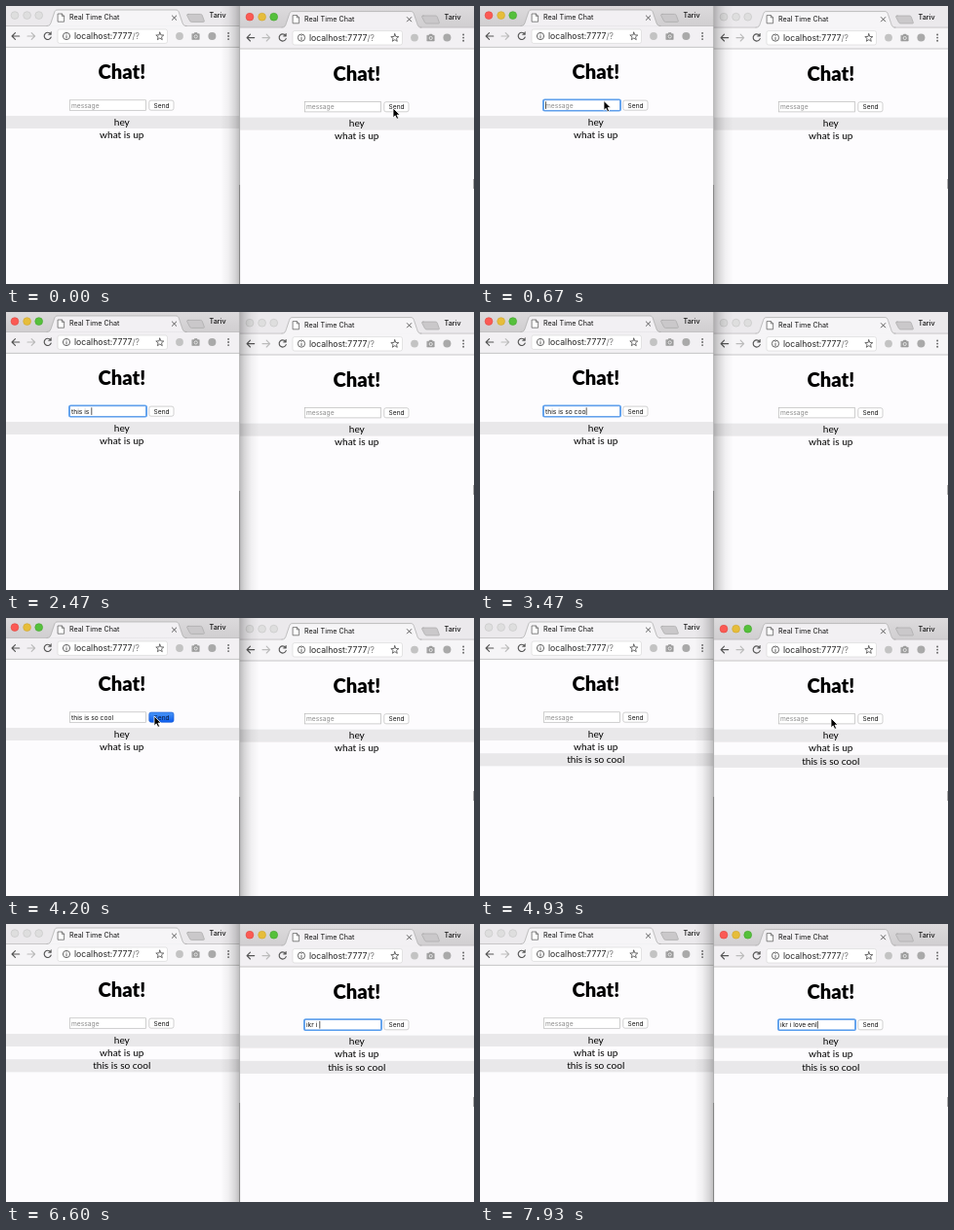
Animation of 480 by 286 pixels, one loop 8000 ms. Source, as an HTML page:

```html
<!DOCTYPE html>
<html lang="en">
<head>
<meta charset="utf-8">
<title>Real Time Chat</title>
<style>
  html, body { margin: 0; width: 100%; height: 100%; overflow: hidden; background: #fff; }
  svg { display: block; width: 480px; height: 286px; }
  .ui { font-family: Inter, Roboto, sans-serif; }
  .page { font-family: Lato, "Open Sans", sans-serif; text-anchor: middle; fill: #000; }
  .line { fill: none; stroke-linecap: round; stroke-linejoin: round; }
</style>
</head>
<body>
<svg id="stage" viewBox="0 0 480 286">
  <defs>
    <linearGradient id="shade">
      <stop offset="0" stop-color="#000" stop-opacity=".26"/>
      <stop offset=".25" stop-color="#000" stop-opacity=".15"/>
      <stop offset=".6" stop-color="#000" stop-opacity=".05"/>
      <stop offset="1" stop-color="#000" stop-opacity="0"/>
    </linearGradient>
    <linearGradient id="strip" x2="0" y2="1">
      <stop offset="0" stop-color="#dddbdd"/>
      <stop offset="1" stop-color="#d0ced0"/>
    </linearGradient>
    <linearGradient id="blue" x2="0" y2="1">
      <stop offset="0" stop-color="#4a97f8"/>
      <stop offset="1" stop-color="#0b5cee"/>
    </linearGradient>
  </defs>
</svg>
<script>
const LOOP = 8000, STEP = 200 / 3;
const stage = document.getElementById('stage');

function el(tag, attrs, parent, text) {
  const node = document.createElementNS('http://www.w3.org/2000/svg', tag);
  set(node, attrs);
  if (text) node.textContent = text;
  parent.appendChild(node);
  return node;
}
function set(node, attrs) {
  for (const key in attrs) node.setAttribute(key, attrs[key]);
}
const show = (node, on) => set(node, { visibility: on ? 'visible' : 'hidden' });

function makeWindow(x, y) {
  const root = el('g', { transform: `translate(${x} ${y})` }, stage);
  const rect = (x, y, width, height, fill, more) =>
    el('rect', { x, y, width, height, fill, ...more }, root);
  const path = (d, stroke, width, more) =>
    el('path', { d, stroke, 'stroke-width': width, class: 'line', ...more }, root);
  const text = (x, y, size, fill, str) =>
    el('text', { x, y, 'font-size': size, fill, class: 'ui' }, root, str);
  const circle = (cx, cy, r, fill, more) => el('circle', { cx, cy, r, fill, ...more }, root);
  const page = (y, size, weight, str) =>
    el('text', { x: 118.8, y, 'font-size': size, 'font-weight': weight, class: 'page' }, root, str);

  // Frame and tab
  rect(-1, -2, 240.4, 300, '#fdfcfe');
  const strip = rect(-1, -2, 240.4, 23, '#ebe9ec');
  const bar = rect(-1, 20.5, 240.4, 22, '#f2f0f3');
  path('M-1 20.5H42M184 20.5H239.4', '#b8b6b8', .7);
  const tab = path('M42 20.5C45 20.5 45.5 19 46.5 16L49.5 7C50.3 4.6 51 4 53 4H174C176 4 176.7 4.6 177.5 7L180.5 16C181.5 19 182 20.5 185 20.5', '#aaa', .7);
  path('M-1 42.4H239.4', '#b9b9b9', .8);
  path('M187 8.4H199.5Q200.8 8.4 201.3 9.6L203.3 15.2Q203.7 16.4 202.5 16.4H190.5Q189 16.4 188.5 15.2L185.6 9.6Q185.2 8.4 187 8.4Z', '#a9a9a9', .7, { style: 'fill:#cac8ca' });
  const lights = [9, 21.6, 33.7].map(cx => circle(cx, 9.6, 3.9, '#ddd', { 'stroke-width': .6 }));
  path('M53.5 8H57.3L59.6 10.3V16.2H53.5ZM57.3 8V10.3H59.6', '#666', .8, { style: 'fill:#fff' });
  text(65, 14.4, 7.2, '#111', 'Real Time Chat');
  path('M170.4 10L174.7 14.3M174.7 10L170.4 14.3', '#555', .95);
  set(text(208.5, 12.2, 7.2, '#111', 'Tariv'), { 'font-weight': 500 });

  // Toolbar
  path('M13.7 31H6.2M9.5 27.6L6.1 31L9.5 34.4', '#555', 1.15);
  path('M22 31H29.5M26.2 27.6L29.6 31L26.2 34.4', '#bbb', 1.15);
  path('M45.6 28.6A3.6 3.6 0 1 0 46.2 32', '#555', 1.15);
  path('M46.4 26.8V29.6H43.6Z', '#555', .5, { style: 'fill:#555' });
  rect(53, 24, 112.5, 14.4, '#fff', { rx: 2, stroke: '#d4d4d4', 'stroke-width': .6 });
  circle(62, 31, 3.6, 'none', { stroke: '#555', 'stroke-width': .9 });
  path('M62 30.7V33M62 29V29.1', '#555', .9);
  const url = text(70, 34, 8.65, '#222', 'localhost:7777');
  el('tspan', { fill: '#777' }, url, '/?');
  let star = '';
  for (let i = 0; i < 10; i++) {
    const r = i % 2 ? 1.8 : 4.2, a = i * Math.PI / 5;
    star += `${i ? 'L' : 'M'}${157.8 + r * Math.sin(a)} ${31.3 - r * Math.cos(a)}`;
  }
  path(star + 'Z', '#555', .85);
  circle(178, 31, 3.9, '#c3c3c3');
  path('M191.1 28.7H192.7L193.5 27.5H195.9L196.7 28.7H198.2V34.4H191.1Z', '#9b9b9b', .6, { style: 'fill:#9b9b9b' });
  circle(194.7, 31.4, 1.6, '#9b9b9b', { stroke: '#f3f3f3', 'stroke-width': .8 });
  circle(211.4, 31, 4, '#a9a9a9');
  for (const cy of [27.9, 31, 34.1]) circle(228.1, cy, .95, '#666');

  // Page
  page(75.2, 20.2, 900, 'Chat!');
  const ring = rect(65, 96.6, 79, 10.9, 'none', { rx: 1.5, stroke: '#5fa3f0', 'stroke-width': 2 });
  const box = rect(65.4, 96.8, 78.2, 10.5, '#fff', { 'stroke-width': .7 });
  const field = text(67, 104.5, 6.7, '#111', 'message');
  const caret = rect(67, 98.3, .7, 7.6, '#111');
  const button = rect(146.8, 97.1, 25.2, 10.1, '#fff', { rx: 2, stroke: '#bdbdbd', 'stroke-width': .7 });
  const label = text(151.6, 104.5, 6.6, '#111', 'Send');
  rect(-1, 113, 240.4, 13, '#e9e8ea');
  page(122.5, 10.1, 400, 'hey');
  page(135.8, 10.1, 400, 'what is up');
  const fresh = [rect(-1, 139.2, 240.4, 13.2, '#e9e8ea'), page(149, 10.1, 400, 'this is so cool')];

  function update({ active, focus, value, blink, pressed, sent }) {
    const surface = active ? '#f2f0f3' : '#f6f5f7';
    set(strip, { fill: active ? 'url(#strip)' : '#ebe9ec' });
    set(bar, { fill: surface });
    set(tab, { style: `fill:${surface}` });
    const fills = active ? ['#fb5a54', '#e6bd3a', '#55c03b'] : ['#dedede', '#dedede', '#dedede'];
    const rims = active ? ['#e04840', '#cfa52f', '#43a52e'] : ['#c4c4c4', '#c4c4c4', '#c4c4c4'];
    lights.forEach((dot, i) => set(dot, { fill: fills[i], stroke: rims[i] }));
    show(ring, focus);
    set(box, { stroke: focus ? '#4a90e6' : '#bbb' });
    // Hard spaces keep the trailing gap measurable
    field.textContent = value.replace(/ /g, '\u00a0') || 'message';
    set(field, { fill: value ? '#111' : '#8c8c8c' });
    set(caret, { x: 67 + (value ? field.getComputedTextLength() + .3 : 0) });
    show(caret, focus && blink);
    set(button, { fill: pressed ? 'url(#blue)' : '#fff', stroke: pressed ? '#1b5fd6' : '#bdbdbd' });
    set(label, { fill: pressed ? '#0a1c3c' : '#111' });
    fresh.forEach(node => show(node, sent));
  }
  return { root, update };
}

const left = makeWindow(0, 0);
const right = makeWindow(241, 1.6);
const shade = el('rect', { width: 20, height: 290, fill: 'url(#shade)' }, stage);
el('path', { d: 'M239.6 0V184', stroke: '#aaa', 'stroke-width': .7 }, stage);
el('path', { d: 'M239.6 184V286', stroke: '#777', 'stroke-width': .9 }, stage);
el('path', { d: 'M479.7 178V188', stroke: '#666', 'stroke-width': .6 }, stage);
const cursor = el('path', {
  d: 'M0 0V9.9L2.2 7.8L3.8 11.3L5.6 10.5L4 7.1H7.1Z',
  fill: '#000', stroke: '#fff', 'stroke-width': .8, 'stroke-linejoin': 'round'
}, stage);

const ACTIVATE_LEFT = 530, FOCUS_LEFT = 590, PRESS = 4050, SEND = 4390;
const ACTIVATE_RIGHT = 4850, FOCUS_RIGHT = 5320;
const first = { text: 'this is so cool', start: 1260, pace: 150 };
const second = { text: 'ikr i love enl', start: 5600, pace: 165 };

// Cursor legs: start, end, then the point it reaches
const legs = [[70, 500, 127, 97.5], [3600, 3950, 152, 101], [4420, 4800, 360, 103]];

function cursorAt(t) {
  let x = 397, y = 105;
  for (const [from, to, tx, ty] of legs) {
    const k = Math.min(1, Math.max(0, (t - from) / (to - from)));
    const e = k * k * (3 - 2 * k);
    x += (tx - x) * e;
    y += (ty - y) * e;
  }
  return `translate(${x} ${y})`;
}

function typed({ text, start, pace }, t) {
  return text.slice(0, Math.max(0, Math.floor((t - start) / pace)));
}

// The caret stays on while typing and blinks while idle
function blinkAt(t, focusTime, { text, start, pace }) {
  const end = start + pace * text.length;
  if (t > start && t < end) return true;
  return (t - (t < end ? focusTime : end)) % 1000 < 500;
}

function draw(t) {
  const leftActive = t >= ACTIVATE_LEFT && t < ACTIVATE_RIGHT;
  const sent = t >= SEND;
  left.update({
    active: leftActive,
    focus: t >= FOCUS_LEFT && t < PRESS,
    value: sent ? '' : typed(first, t),
    blink: blinkAt(t, FOCUS_LEFT, first),
    pressed: t >= PRESS && t < SEND - 60,
    sent
  });
  right.update({
    active: !leftActive,
    focus: t >= FOCUS_RIGHT,
    value: typed(second, t),
    blink: blinkAt(t, FOCUS_RIGHT, second),
    pressed: false,
    sent
  });
  set(shade, { transform: leftActive ? 'translate(239.6 0)' : 'translate(240 0) scale(-1 1)' });
  set(cursor, { transform: cursorAt(t) });
  const typing = (t > first.start + first.pace && t < 3560) || t > second.start + second.pace;
  show(cursor, !typing);
}

function tick() {
  const t = (performance.now() + 5) % LOOP;
  draw(Math.floor(t / STEP) * STEP);
  requestAnimationFrame(tick);
}
tick();
</script>
</body>
</html>
```
